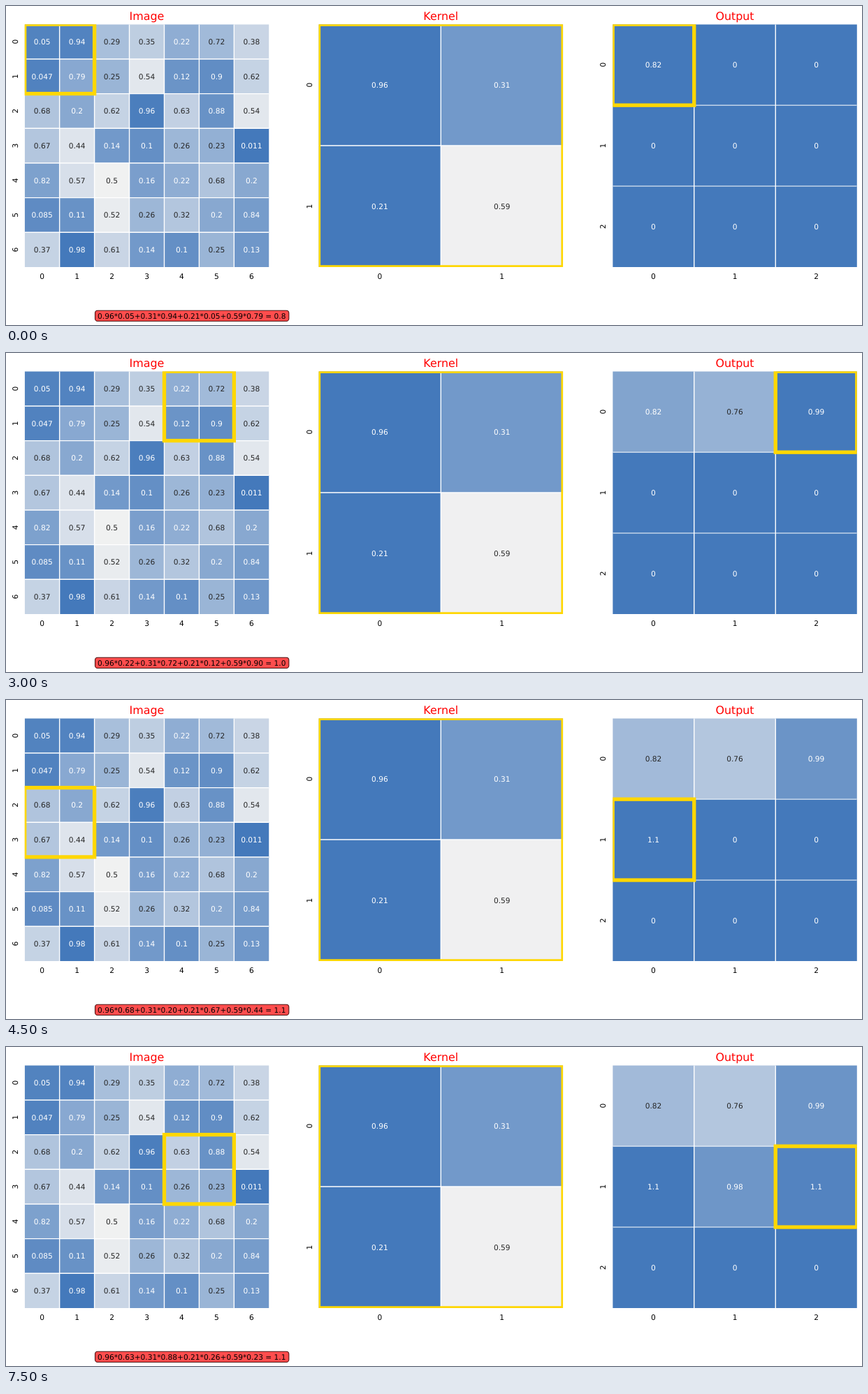
Recreate the animation shown at these times as an HTML page. Size 1225 px wide and 457 px high, loop 8000 ms.

```html
<!DOCTYPE html>
<html lang="en">
<head>
<meta charset="utf-8">
<title>Strided convolution</title>
<style>
  html, body { margin: 0; width: 100%; height: 100%; overflow: hidden; background: #fff; }
  svg { display: block; width: 100%; height: 100%; }
  text {
    font: 10.62px "DejaVu Sans", sans-serif;
    text-anchor: middle;
    text-rendering: geometricPrecision;
    white-space: pre;
  }
  .title { font-size: 15.9px; fill: #f00; }
  .frame { fill: none; stroke: #ffd700; stroke-width: 5.3; }
</style>
</head>
<body>
<svg id="stage" viewBox="0 0 1225 457"></svg>
<script>
const LOOP = 8000, STEP = 1500, STEPS = 6;
const TOP = 26.3, WIDTH = 349.6, HEIGHT = 347.6;
const EDGE = [68, 121, 187], MIDDLE = [242, 242, 242];

const image = [
  [.05, .94, .29, .35, .22, .72, .38],
  [.047, .79, .25, .54, .12, .9, .62],
  [.68, .2, .62, .96, .63, .88, .54],
  [.67, .44, .14, .1, .26, .23, .011],
  [.82, .57, .5, .16, .22, .68, .2],
  [.085, .11, .52, .26, .32, .2, .84],
  [.37, .98, .61, .14, .1, .25, .13]
];
const kernel = [[.96, .31], [.21, .59]];
const stage = document.getElementById("stage");

function add(parent, tag, attrs, content) {
  const node = document.createElementNS("http://www.w3.org/2000/svg", tag);
  for (const key in attrs) node.setAttribute(key, attrs[key]);
  if (content !== undefined) node.textContent = content;
  parent.appendChild(node);
  return node;
}

// Text centred on a point, optionally turned to read upwards.
function label(parent, x, y, content, attrs = {}, turned = false) {
  const place = `translate(${x} ${y})` + (turned ? " rotate(-90)" : "");
  return add(parent, "text", { transform: place, y: 3.87, ...attrs }, content);
}

// Blue at both ends of the range, pale in the middle.
function shade(value, min, max) {
  const t = (value - min) / (max - min);
  const light = 1 - Math.abs(2 * t - 1);
  const rgb = EDGE.map((e, i) => Math.round(e + (MIDDLE[i] - e) * light));
  return { fill: `rgb(${rgb})`, ink: light > .44 ? "#262626" : "#fff" };
}

function makePanel(title, left, size, rowLine) {
  const w = WIDTH / size, h = HEIGHT / size;
  const id = "clip-" + title;
  const clip = add(stage, "clipPath", { id });
  add(clip, "rect", { x: left, y: TOP, width: WIDTH, height: HEIGHT });
  const body = add(stage, "g", { "clip-path": `url(#${id})` });
  const cells = [];

  for (let r = 0; r < size; r++) {
    for (let c = 0; c < size; c++) {
      const x = left + c * w, y = TOP + r * h;
      cells.push({
        rect: add(body, "rect", { x, y, width: w + .5, height: h + .5 }),
        text: label(body, x + w / 2, y + h / 2, "")
      });
    }
  }
  for (let i = 1; i < size; i++) {
    const x = left + i * w, y = TOP + i * h;
    add(body, "path", { d: `M${x} ${TOP}v${HEIGHT}`, stroke: "#fff", "stroke-width": 1.4 });
    add(body, "path", { d: `M${left} ${y}h${WIDTH}`, stroke: "#fff", "stroke-width": rowLine });
  }
  for (let i = 0; i < size; i++) {
    label(stage, left + (i + .5) * w, 387, i);
    label(stage, left - 13.6, TOP + (i + .5) * h, i, {}, true);
  }
  add(stage, "text", { class: "title", x: left + WIDTH / 2, y: 20.2 }, title);
  const frame = add(body, "rect", { class: "frame" });

  return {
    fill(values) {
      const flat = values.flat();
      const min = Math.min(...flat), max = Math.max(...flat);
      flat.forEach((v, i) => {
        const { fill, ink } = shade(v, min, max);
        cells[i].rect.setAttribute("fill", fill);
        cells[i].text.setAttribute("fill", ink);
        cells[i].text.textContent = Number(v.toPrecision(2));
      });
    },
    mark(row, col, span) {
      const box = { x: left + col * w, y: TOP + row * h, width: span * w, height: span * h };
      for (const key in box) frame.setAttribute(key, box[key]);
    }
  };
}

const input = makePanel("Image", 26.7, 7, 1.4);
const weights = makePanel("Kernel", 447.5, 2, 1.5);
const output = makePanel("Output", 868.2, 3, 1);
input.fill(image);
weights.fill(kernel);
weights.mark(0, 0, 2);

add(stage, "rect", {
  x: 127.5, y: 436.2, width: 277.3, height: 15.3, rx: 3.6,
  fill: "#ff4d4d", stroke: "#4d1010", "stroke-width": 1.1
});
const formula = label(stage, 265.8, 444, "");

// Pairs of kernel weight and image value under the window at a step.
function terms(step) {
  const row = 2 * Math.floor(step / 3), col = 2 * (step % 3);
  return kernel.flatMap((line, r) => line.map((k, c) => [k, image[row + r][col + c]]));
}
const sum = step => terms(step).reduce((total, [k, v]) => total + k * v, 0);

function show(step) {
  const row = Math.floor(step / 3), col = step % 3;
  input.mark(2 * row, 2 * col, 2);
  output.mark(row, col, 1);
  output.fill(Array.from({ length: 9 }, (_, i) => i <= step ? sum(i) : 0));
  const products = terms(step).map(([k, v]) => k.toFixed(2) + "*" + v.toFixed(2));
  formula.textContent = products.join("+") + " = " + sum(step).toFixed(1);
}

let shown = -1;
const start = performance.now();
function tick() {
  const time = (performance.now() - start) % LOOP;
  const step = Math.min(STEPS - 1, Math.floor(time / STEP));
  if (step !== shown) show(shown = step);
  requestAnimationFrame(tick);
}
tick();
</script>
</body>
</html>
```
